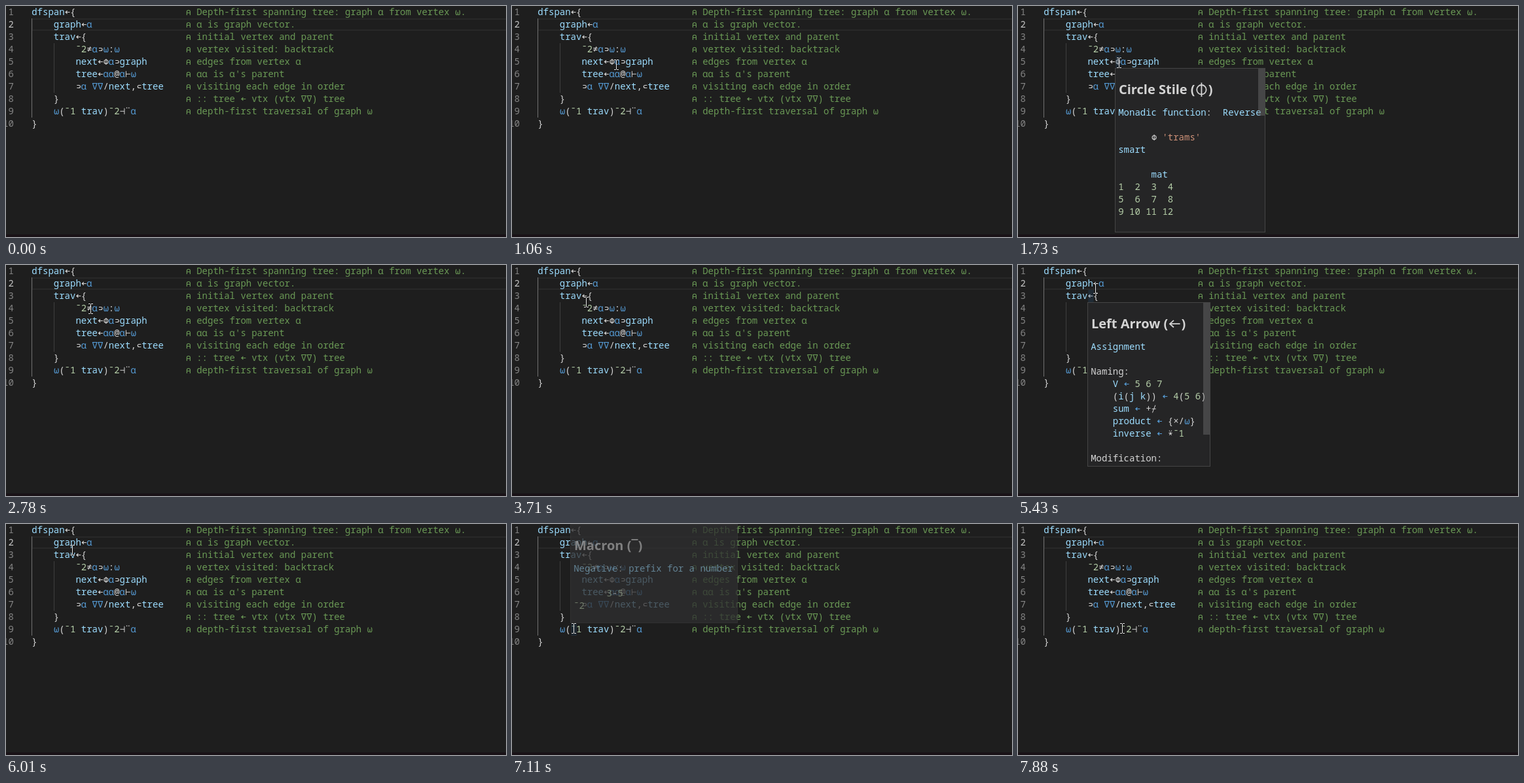
An HTML page with a canvas that plays this animation: 764x354 px, repeating every 8000 ms.

```html
<!DOCTYPE html>
<html lang="en">
<head>
<meta charset="utf-8">
<title>APL hover help</title>
<style>
html, body { margin: 0; width: 100%; height: 100%; overflow: hidden; background: #1e1e1e; }
canvas { display: block; }
</style>
</head>
<body>
<canvas id="stage" width="764" height="354"></canvas>
<script>
const ctx = document.getElementById('stage').getContext('2d');
const LOOP = 8000, STEP = 74;
const CELL = 8.4, LINE = 19, LEFT = 40, NOTE_COL = 28;
const MONO = '500 14px "Noto Sans Mono", "DejaVu Sans Mono", monospace';
const TITLE = 'bold 20px "Open Sans", "DejaVu Sans", sans-serif';
const COLOR = {
  plain: '#d4d4d4', name: '#9cdcfe', key: '#569cd6',
  num: '#b5cea8', str: '#ce9178', note: '#6a9955'
};

// APL symbols drawn as strokes; the origin is the cell's left edge on the baseline
const glyphs = {
  '←': new Path2D('M1.5-4.5H8M4-6.7L1.5-4.5L4-2.3'),
  '⍝': new Path2D('M2 0V-5Q2-7.5 4.5-7.5Q7-7.5 7-5V0M2-3.5H7'),
  '⌽': new Path2D('M1.5-4.5a3 3 0 0 1 6 0a3 3 0 0 1-6 0M4.5-9V0'),
  '⊃': new Path2D('M2-6.5H5a2 2 0 0 1 0 4H2'),
  '⊂': new Path2D('M7.5-6.5H4.5a2 2 0 0 0 0 4H7.5')
};

const code = [
  ['dfspan←{', 'Depth-first spanning tree: graph ⍺ from vertex ⍵.'],
  ['    graph←⍺', '⍺ is graph vector.'],
  ['    trav←{', 'initial vertex and parent'],
  ['        ¯2≠⍺⊃⍵:⍵', 'vertex visited: backtrack'],
  ['        next←⌽⍺⊃graph', 'edges from vertex ⍺'],
  ['        tree←⍺⍺@⍺⊢⍵', "⍺⍺ is ⍺'s parent"],
  ['        ⊃⍺ ∇∇/next,⊂tree', 'visiting each edge in order'],
  ['    }', ':: tree ← vtx (vtx ∇∇) tree'],
  ['    ⍵(¯1 trav)¯2⊣¨⍺', 'depth-first traversal of graph ⍵'],
  ['}', '']
];

// Help by symbol; thumb is the length of the scrollbar
const tips = {
  '⌽': { title: 'Circle Stile', thumb: 72, text: [
    'Monadic function:  Reverse', '', "      ⌽ 'trams'", 'smart', '', '      mat',
    '1  2  3  4', '5  6  7  8', '9 10 11 12', '', '      ⌽ mat'] },
  '≠': { title: 'Not Equal', thumb: 150, text: [
    'Monadic function:  Unique Mask', '', "      ≠ 'Banana'", '1 1 1 0 0 0', '',
    'Dyadic function:   Not Equal To', '', '      1 2 3 ≠ 1.1 2 3', '1 0 0', '', ''] },
  '←': { title: 'Left Arrow', thumb: 202, text: [
    'Assignment', '', 'Naming:', '    V ← 5 6 7', '    (i(j k)) ← 4(5 6)', '    sum ← +⌿',
    '    product ← {×/⍵}', '    inverse ← ⍣¯1', '', 'Modification:', ''] },
  '¯': { title: 'Macron', thumb: 0, text: [
    'Negative: prefix for a number', '', '      3-5', '¯2', ''] }
};

// Where the pointer comes to rest; help opens there for the symbol below it
const start = { x: 653, y: 377 };
const stops = [
  { from: 250, to: 1200, x: 154.5, y: 87, open: 1590, close: 2330 },
  { from: 2180, to: 2780, x: 129.5, y: 67, open: 3070, close: 3680 },
  { from: 3680, to: 3900, x: 102.5, y: 50 },
  { from: 4130, to: 4360, x: 108.5, y: 48, open: 4750, close: 5500 },
  { from: 5270, to: 5500, x: 118.5, y: 36, open: 5800, close: 5940 },
  { from: 5940, to: 6010, x: 98.5, y: 40 },
  { from: 6090, to: 6890, x: 94.5, y: 160, open: 7110, close: 7650 },
  { from: 7570, to: 7880, x: 159.5, y: 160 }
];

const stepped = (t, from, n) => Math.min(1, (Math.floor((t - from) / STEP) + 1) / n);
const easeOut = p => 1 - (1 - p) ** 3;

function rect(x, y, w, h, color) {
  ctx.fillStyle = color;
  ctx.fillRect(x, y, w, h);
}

function drawGlyph(ch, x, y, scale, color) {
  ctx.save();
  ctx.translate(x, y);
  ctx.scale(scale, scale);
  ctx.strokeStyle = color;
  ctx.lineWidth = 1.15 / Math.sqrt(scale);
  ctx.stroke(glyphs[ch]);
  ctx.restore();
}

// One glyph per cell keeps the columns aligned
function cells(text, x, y, color) {
  ctx.font = MONO;
  ctx.fillStyle = color;
  [...text].forEach((ch, i) => {
    const cx = x - 0.8 + i * CELL;
    if (glyphs[ch]) drawGlyph(ch, cx, y, 1, color);
    else if (ch !== ' ') ctx.fillText(ch, cx, y);
  });
}

function tokenColor(s, arrow) {
  if (/^[⍺⍵∇]/.test(s)) return COLOR.key;
  if (s === '←') return arrow;
  if (/^[a-z]/i.test(s)) return COLOR.name;
  if (/^[¯\d]/.test(s)) return COLOR.num;
  return s[0] === "'" ? COLOR.str : COLOR.plain;
}

function highlight(text, x, y, arrow = COLOR.plain) {
  if (/^\w+:$/.test(text)) return cells(text, x, y, COLOR.plain);
  for (const m of text.matchAll(/[a-z]+|¯?\d+(\.\d+)?|'[^']*'|\S/gi))
    cells(m[0], x + m.index * CELL, y, tokenColor(m[0], arrow));
}

function drawEditor() {
  rect(0, 0, 764, 354, '#1e1e1e');
  ctx.strokeStyle = '#282828';
  ctx.lineWidth = 2;
  ctx.strokeRect(LEFT, 20, 740, 17);
  rect(39, LINE, 1, LINE * 8, '#707070');
  rect(73, LINE * 3, 1, LINE * 4, '#404040');
  code.forEach(([src, note], i) => {
    const y = 14 + i * LINE, num = String(i + 1);
    cells(num, 12.8 - num.length * CELL, y, i === 1 ? '#c6c6c6' : '#858585');
    highlight(src, LEFT, y);
    if (note) cells('⍝ ' + note, LEFT + NOTE_COL * CELL, y, COLOR.note);
  });
  rect(0, 350, 764, 4, '#191217');
}

function drawTitle(title, sym, x, y) {
  const scale = 2.4;
  ctx.font = TITLE;
  ctx.fillStyle = COLOR.plain;
  const put = s => {
    ctx.fillText(s, x, y);
    x += ctx.measureText(s).width;
  };
  put(title + ' (');
  if (glyphs[sym]) {
    drawGlyph(sym, x - 1, y + 4, scale, COLOR.plain);
    x += CELL * scale;
  } else put(sym);
  put(')');
}

function drawTip(stop, t) {
  const row = Math.floor(stop.y / LINE), col = Math.floor((stop.x - LEFT) / CELL);
  const sym = code[row][0][col], { title, text, thumb } = tips[sym];
  const w = Math.round(Math.max(...text.map(s => s.length)) * CELL + 12);
  const h = Math.min(252, 57 + text.length * LINE);
  const glyphX = LEFT + col * CELL, top = row * LINE;
  const x = Math.floor(glyphX - 1), y = top >= h ? top - h : top + LINE;
  rect(glyphX, top, CELL, LINE, 'rgba(38,79,120,.25)');
  ctx.save();
  ctx.globalAlpha = stepped(t, stop.open, 2);
  rect(x, y, w, h, '#454545');
  rect(x + 1, y + 1, w - 2, h - 2, '#252526');
  ctx.beginPath();
  ctx.rect(x + 1, y + 1, w - 2, h - 2);
  ctx.clip();
  drawTitle(title, sym, x + 6, y + 40);
  text.forEach((s, i) => highlight(s, x + 6, y + 73 + i * LINE, COLOR.key));
  rect(x + w - 11, y + 1, 10, thumb, 'rgba(121,121,121,.4)');
  ctx.restore();
}

function pointerAt(t) {
  let { x, y } = start;
  for (const s of stops.filter(s => t >= s.from)) {
    const n = Math.round((s.to - s.from) / STEP) + 1;
    const k = easeOut(stepped(t, s.from, n));
    x += (s.x - x) * k;
    y += (s.y - y) * k;
  }
  return [Math.floor(x), Math.round(y)];
}

function drawPointer([x, y]) {
  const beam = (grow, color) => {
    const bar = (dx, dy, w, h) =>
      rect(x + dx - grow, y + dy - grow, w + 2 * grow, h + 2 * grow, color);
    bar(0, -7, 1, 14);
    for (const dx of [-3, 1]) for (const dy of [-8, 7]) bar(dx, dy, 3, 1);
  };
  beam(0.5, 'rgba(0,0,0,.6)');
  beam(0, '#f0f0f0');
}

function frame() {
  const t = performance.now() % LOOP;
  drawEditor();
  for (const s of stops) if (t >= s.open && t < s.close) drawTip(s, t);
  if (t >= stops[0].from) drawPointer(pointerAt(t));
  requestAnimationFrame(frame);
}
frame();
</script>
</body>
</html>
```
